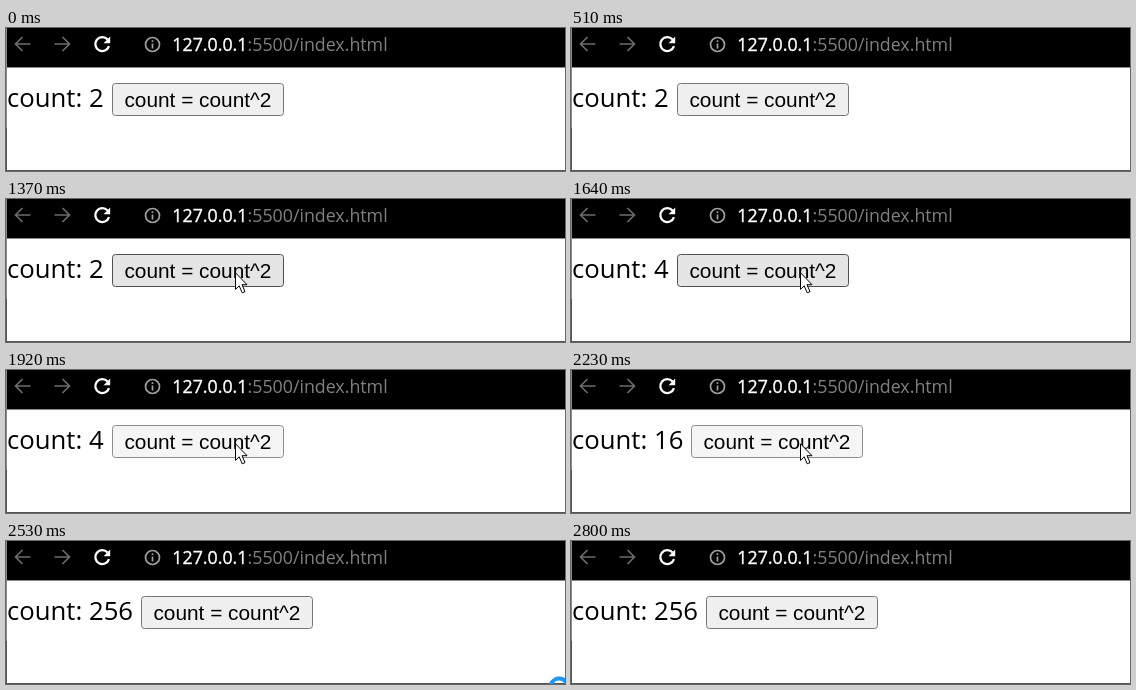
These frames come from a looping animation (559 px wide and 143 px high, 3140 ms). An HTML page:

```html
<!DOCTYPE html>
<html lang="en">
<head>
<meta charset="utf-8">
<title>Counter</title>
<style>
  html, body { margin: 0; width: 100%; height: 100%; overflow: hidden; background: #fff; }
  svg { display: block; width: 559px; height: 143px; }
  .line { fill: none; stroke-width: 1.7; }
  .url { font: 17.8px "Open Sans", sans-serif; fill: #808080; }
  .host { fill: #fff; stroke: #fff; stroke-width: .35; }
  .count { font: 25.7px "Open Sans", sans-serif; }
  .label { font: 20.83px "Liberation Sans", Arial, sans-serif; }
</style>
</head>
<body>
<svg viewBox="0 0 559 143">
  <rect width="559" height="39"/>
  <path class="line" stroke="#6c6c6c" d="M24.5 16H9.5M16.5 9L9.5 16L16.5 23M48.5 16H63.5M56.5 9L63.5 16L56.5 23"/>
  <path class="line" stroke="#fff" stroke-width="2" style="stroke-width: 2.3" d="M101.6 11.4A7 7 0 1 0 103 18.2"/>
  <path fill="#fff" d="M104.2 8.5V15.2H97.5Z"/>
  <circle class="line" stroke="#a0a0a0" cx="146.5" cy="16.5" r="7"/>
  <path class="line" stroke="#a0a0a0" d="M146.5 15.5V20.5M146.5 12.3V14"/>
  <text class="url" x="166.3" y="23"><tspan class="host">127.0.0.1</tspan>:5500/index.html</text>

  <path fill="#8a8a8a" d="M0 0H1V39H559V40H1V100H0Z"/>
  <path fill="#555" d="M0 100H1V142H559V143H0Z"/>

  <text class="count" x="1.1" y="79">count: <tspan id="value">2</tspan></text>
  <g id="button">
    <rect id="face" x=".5" y="55.5" width="171" height="32" rx="3"/>
    <text class="label" x="12.4" y="79">count = count^2</text>
  </g>

  <path id="arrow" fill="#fff" stroke="#000" d="M.5 .8V17.4L4.2 13.8L7.2 20.8L10 19.6L7 12.7H12Z"/>
  <g id="ring" fill="none" stroke-width="4">
    <circle r="8.5" stroke="#2196f3"/>
    <path stroke="#7cc8fa" stroke-width="2" d="M-8.5 0A8.5 8.5 0 0 1 0 -8.5"/>
  </g>
</svg>
<script>
  const LOOP = 3140, STEP = 30, ENTER = 1130, BUSY = 2530, REST = [229, 73];
  const $ = id => document.getElementById(id);
  const value = $('value'), button = $('button'), face = $('face');
  const arrow = $('arrow'), ring = $('ring');

  // [press, release] times; each release squares the count
  const clicks = [[1550, 1640], [1920, 2010], [2230, 2350]];

  // [time, x, y]; no position means the pointer is off the page
  const stops = [
    [0], [90, 376, 139], [120, 375, 137], [150],
    [480, 384, 140], [510],
    ...Array.from({ length: 9 }, (_, i) => {
      const left = (1 - i / 8) ** 2;
      return [ENTER + i * STEP, REST[0] + 189 * left, REST[1] + 68 * left];
    }),
    [2440, 258, 80], [2470, 328, 96], [2500, 422, 118], [BUSY, 553, 146], [2560],
    [2650, 545, 144], [2680, 522, 138], [2710, 501, 134], [2740, 484, 131],
    [2770, 476, 131], [2800]
  ];

  const colors = {
    idle: ['#efefef', '#767676'],
    hover: ['#e5e5e5', '#4f4f4f'],
    active: ['#f5f5f5', '#8d8d8d']
  };

  function place(node, shown, transform) {
    node.style.display = shown ? '' : 'none';
    if (shown) node.setAttribute('transform', transform);
  }

  function draw(t) {
    const count = clicks.reduce((n, [, up]) => t >= up ? n * n : n, 2);
    const left = Math.floor(106 + 14.6 * (String(count).length - 1));
    const [, x, y] = stops.findLast(([start]) => t >= start);
    const over = x >= left && x < left + 172 && y >= 55 && y < 88;
    const pressed = clicks.some(([down, up]) => t >= down && t < up);
    const [fill, stroke] = colors[pressed ? 'active' : over ? 'hover' : 'idle'];

    value.textContent = count;
    button.setAttribute('transform', `translate(${left})`);
    face.setAttribute('fill', fill);
    face.setAttribute('stroke', stroke);

    const visible = x !== undefined, busy = t >= BUSY;
    const spot = `translate(${Math.round(x)} ${Math.round(y)})`;
    place(arrow, visible && !busy, spot);
    place(ring, visible && busy, `${spot} rotate(${Math.floor((t + 10) / STEP) * 20})`);
  }

  const begin = performance.now();
  function tick() {
    draw((performance.now() - begin) % LOOP);
    requestAnimationFrame(tick);
  }
  tick();
</script>
</body>
</html>
```
